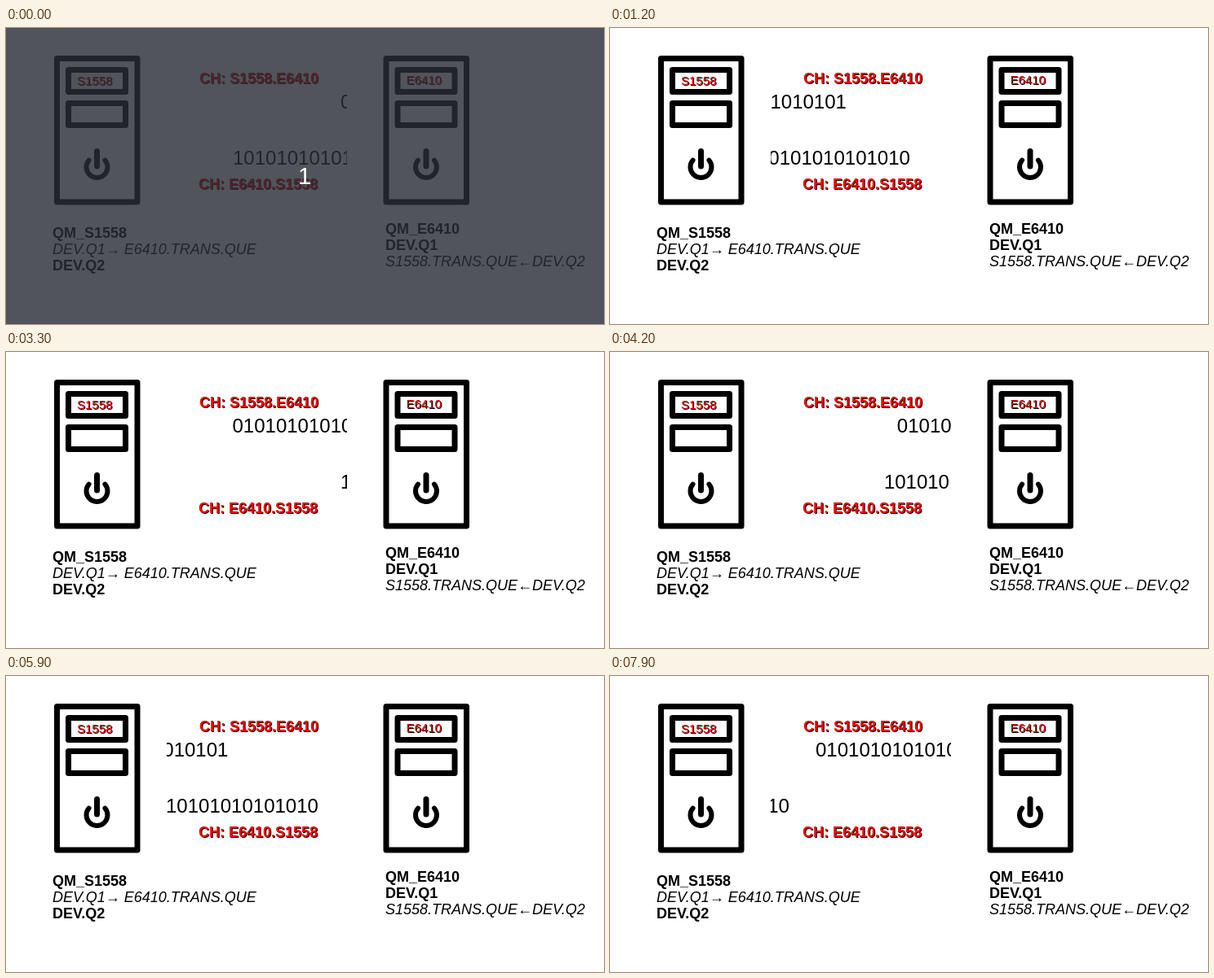
An HTML page with a canvas that plays this animation: 733 by 364 pixels, repeating every 8000 ms.

```html
<!DOCTYPE html>
<html lang="en">
<head>
<meta charset="utf-8">
<title>Message queue channels</title>
<style>
  html, body { margin: 0; width: 100%; height: 100%; overflow: hidden; background: #fff; }
  canvas { display: block; }
</style>
</head>
<body>
<canvas id="stage" width="733" height="364"></canvas>
<script>
const ctx = document.getElementById('stage').getContext('2d');
const LOOP = 8000, STEP = 100;
const LANE = { left: 197, right: 418, text: 187 };
const TRAVEL = LANE.right - LANE.left + LANE.text;

// Distance travelled in px at a time in ms; the pace wavers slightly.
const RIGHTWARD = [[0, 400], [1200, 501], [2100, 572], [2700, 624], [3300, 675.5],
  [3600, 701], [5000, 815], [6800, 968], [7200, 998], [7900, 1058]];
const LEFTWARD = [[0, 140], [900, 212], [1200, 237], [2100, 313.5], [3300, 416],
  [5000, 556], [6800, 704], [7900, 793]];

function distance(keys, t) {
  const i = Math.max(1, keys.findIndex(k => k[0] >= t));
  const [t0, d0] = keys[i - 1], [t1, d1] = keys[i];
  return (d0 + (d1 - d0) * (t - t0) / (t1 - t0)) % TRAVEL;
}

function text(str, x, y, size, style = '', color = '#000') {
  ctx.font = `${style} ${size}px "Liberation Sans", Arial, sans-serif`;
  ctx.fillStyle = color;
  ctx.fillText(str, x, y);
}

function shadowed(str, x, y, size, style, color) {
  text(str, x + 1, y + 1, size, style);
  text(str, x, y, size, style, color);
}

function server(x, label, labelY) {
  ctx.save();
  ctx.translate(x, 0);
  ctx.lineWidth = 7;
  ctx.lineJoin = ctx.lineCap = 'round';
  ctx.strokeRect(3.5, 37.5, 98.5, 176.5);
  ctx.strokeRect(17.5, 51.5, 70, 27);
  ctx.strokeRect(17.5, 92.5, 70, 27);
  ctx.beginPath();
  ctx.moveTo(52.5, 151.5);
  ctx.lineTo(52.5, 170);
  ctx.stroke();
  ctx.lineWidth = 6;
  ctx.beginPath();
  ctx.arc(52.5, 171, 13, -0.7, Math.PI + 0.7);
  ctx.stroke();
  shadowed(label, 28, labelY, 15, '', '#e00');
  ctx.restore();
}

function lanes(t) {
  ctx.save();
  ctx.beginPath();
  ctx.rect(LANE.left, 0, LANE.right - LANE.left, 364);
  ctx.clip();
  text('01'.repeat(7), LANE.left - LANE.text + distance(RIGHTWARD, t), 99, 24);
  text('10'.repeat(7), LANE.right - distance(LEFTWARD, t), 168, 24);
  ctx.restore();
}

function draw(t) {
  ctx.fillStyle = '#fff';
  ctx.fillRect(0, 0, 733, 364);
  server(59, 'S1558', 70);
  server(462.5, 'E6410', 69);
  lanes(t);

  shadowed('CH: S1558.E6410', 237, 68, 18, 'bold', '#f00');
  shadowed('CH: E6410.S1558', 236, 198, 18, 'bold', '#f00');
  text('QM_S1558', 57, 258, 18, 'bold');
  text('DEV.Q1→ E6410.TRANS.QUE', 57, 278, 18, 'italic');
  text('DEV.Q2', 57, 298, 18, 'bold');
  text('QM_E6410', 465, 253, 18, 'bold');
  text('DEV.Q1', 465, 273, 18, 'bold');
  text('S1558.TRANS.QUE←DEV.Q2', 465, 293, 18, 'italic');

  // Last count of the countdown
  if (t < STEP) {
    ctx.fillStyle = 'rgba(41, 45, 53, .81)';
    ctx.fillRect(0, 0, 733, 364);
    text('1', 358, 192, 29, '', '#fff');
  }
}

const start = performance.now();
function tick() {
  const t = (performance.now() - start) % LOOP;
  draw(Math.floor(t / STEP) * STEP);
  requestAnimationFrame(tick);
}
tick();
</script>
</body>
</html>
```
